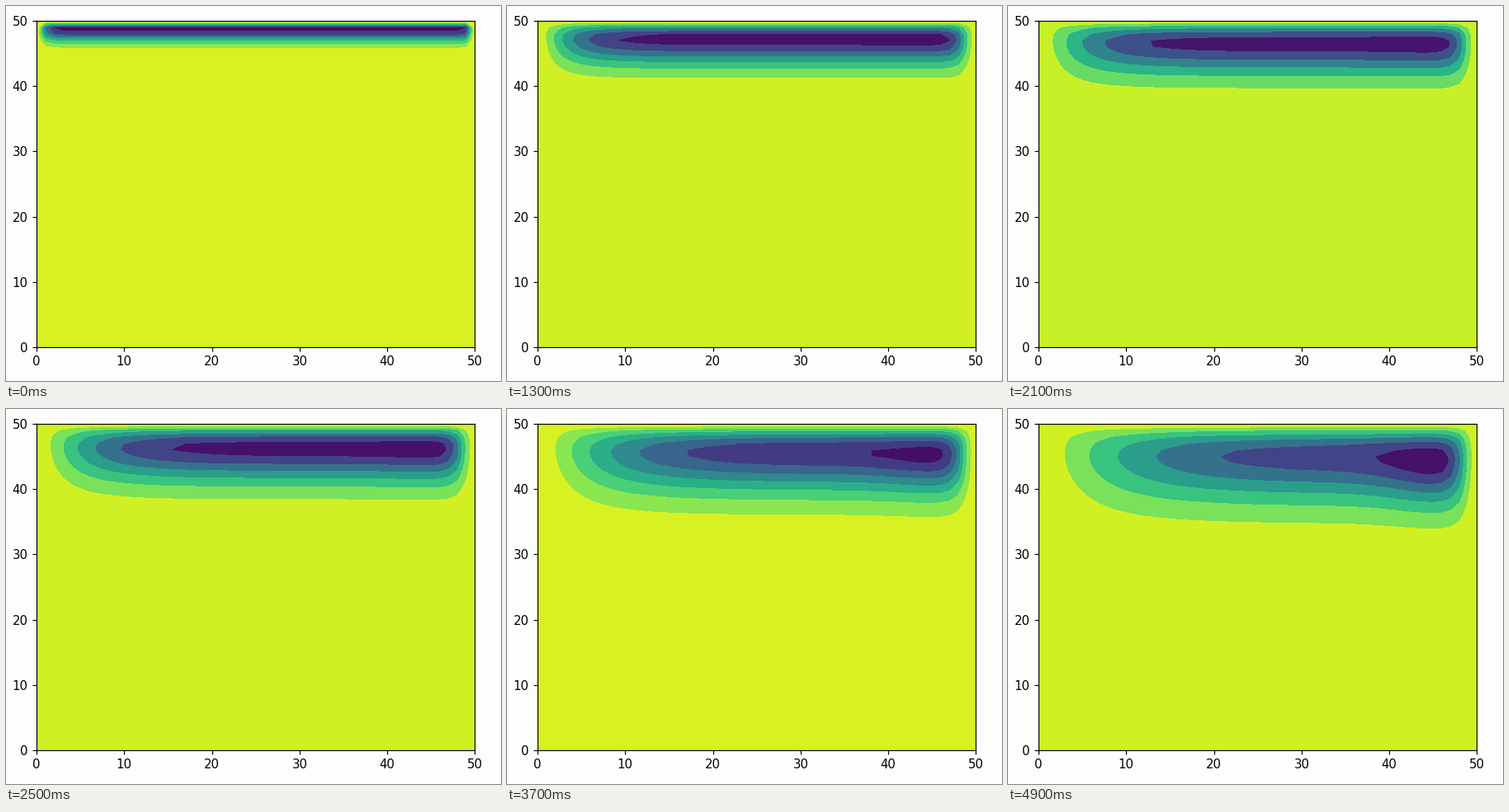
These frames come from a looping animation (600x455 px, 5 s). A matplotlib script:

```python
import numpy as np
import matplotlib.pyplot as plt
from matplotlib.animation import FuncAnimation
from matplotlib.colors import ListedColormap

WIDTH, HEIGHT, DPI = 600, 455, 100
FRAMES, INTERVAL = 50, 100
SIZE = 50
ZOOM = 1.07  # enlargement of the default plot style

plt.rcParams.update({
    "font.family": "DejaVu Sans",
    "font.size": 10 * ZOOM,
    "axes.linewidth": 0.8 * ZOOM,
    **{f"{axis}tick.major.{key}": value * ZOOM for axis in "xy"
       for key, value in (("size", 3.5), ("width", 0.8), ("pad", 3.5))},
})
x, y = np.meshgrid(np.arange(SIZE + 1.0), np.arange(SIZE + 1.0))
depth = SIZE - y


def video_viridis():
    """Viridis encoded with BT.709 weights and decoded with BT.601 ones."""
    r, g, b = plt.get_cmap("viridis")(np.linspace(0, 1, 256))[:, :3].T
    luma = 0.2126 * r + 0.7152 * g + 0.0722 * b
    cb, cr = (b - luma) / 1.8556, (r - luma) / 1.5748
    rgb = (luma + 1.402 * cr, luma - 0.344 * cb - 0.714 * cr, luma + 1.772 * cb)
    return ListedColormap(np.clip(np.column_stack(rgb), 0, 1))


def rise(distance, scale, power):
    """Growth from 0 at a side wall to 1 in the bulk."""
    return 1 - np.exp(-(distance / scale) ** power)


def blend(a, b, gamma=0.55):
    """Hamacher product: like a * b, but fuller where both are small."""
    return a * b / (gamma + (1 - gamma) * (a + b - a * b))


def stream_function(t):
    """Flow below a moving lid: a spreading layer swept to the right."""
    age = t + 0.02
    strength = 4 * age * (1 - 0.0047 * age**2)
    left_scale = 0.9 + 2.6 * t - 0.08 * t**2
    right_scale = 0.6 + 1.4 * (1 - np.exp(-t / 0.9))
    along = (rise(x, left_scale, 1.2)
             * rise(SIZE - x, right_scale, 1.7))

    # Eddy that builds up near the right wall
    eddy = 0.0465 * (t / 3) ** 2.8 * np.exp(-((x - 45.5) / 6.3) ** 2)

    thickness = np.sqrt(1.6 + 4.85 * t) * (1 + 0.55 * eddy)
    thickness *= 1 - 0.35 * np.exp(-4 * x / left_scale)
    q = depth / thickness
    power = 1.5 + eddy
    layer = q * np.exp((1 - q**power) / power)
    return -strength * (1 + eddy) * blend(along, layer)


cmap = video_viridis()
fig = plt.figure(figsize=(WIDTH / DPI, HEIGHT / DPI), dpi=DPI,
                 facecolor="#fdfdfd")
ax = fig.add_axes([37 / WIDTH, 41 / HEIGHT, 531.4 / WIDTH, 396 / HEIGHT])


def draw(i):
    ax.clear()
    ax.contourf(x, y, stream_function(i * INTERVAL / 1000), cmap=cmap)
    ax.set(xlim=(0, SIZE), ylim=(0, SIZE),
           xticks=range(0, SIZE + 1, 10), yticks=range(0, SIZE + 1, 10))
    return ax.collections


anim = FuncAnimation(fig, draw, frames=FRAMES, interval=INTERVAL,
                     init_func=lambda: draw(0), repeat=True, repeat_delay=0)
plt.show()
```
